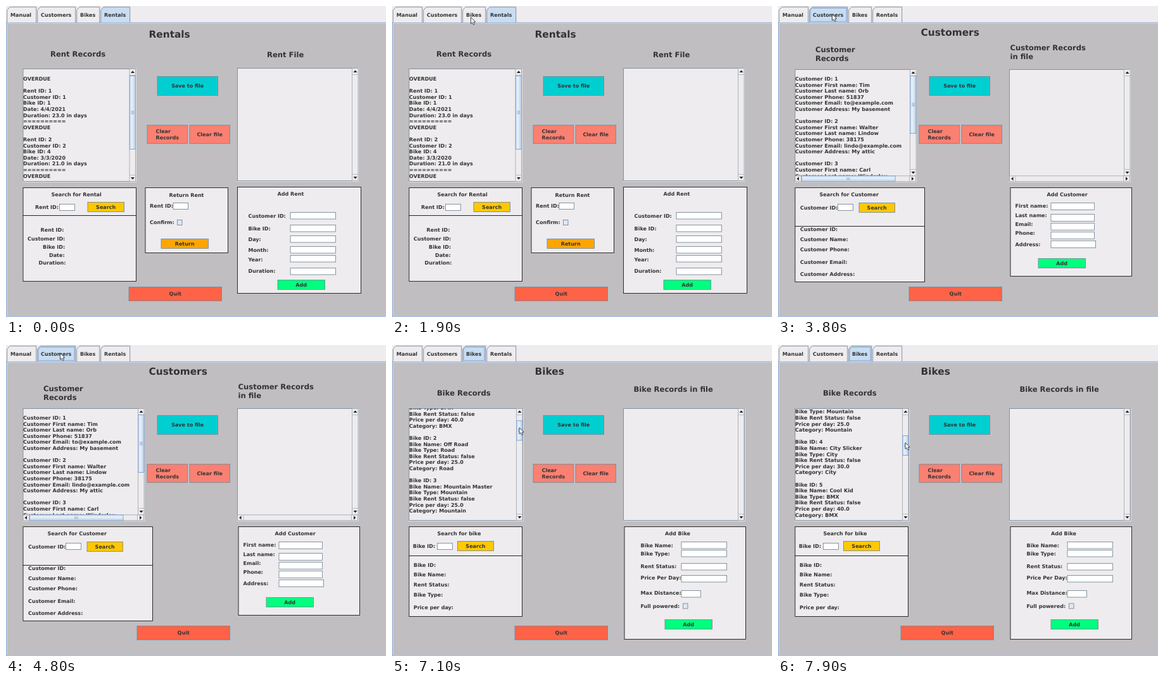
These frames come from a looping animation (600 px wide and 492 px high, 8 s). An HTML page:

```html
<!DOCTYPE html>
<html lang="en">
<head>
<meta charset="utf-8">
<title>Bike rental manager</title>
<style>
  html, body { margin: 0; width: 100%; height: 100%; overflow: hidden; background: #eeecee; }
  svg { display: block; }
  text {
    font-family: "DejaVu Sans", sans-serif; font-weight: bold; fill: #333;
    text-rendering: geometricPrecision; white-space: pre;
  }
</style>
</head>
<body>
<svg id="stage" width="600" height="492" viewBox="0 0 600 492">
  <defs>
    <linearGradient id="thumb">
      <stop offset="0" stop-color="#d4e3f5"/>
      <stop offset=".4" stop-color="#e6f0fa"/>
      <stop offset="1" stop-color="#b8cfe5"/>
    </linearGradient>
    <linearGradient id="thumbH" x2="0" y2="1">
      <stop offset="0" stop-color="#d4e3f5"/>
      <stop offset=".4" stop-color="#e6f0fa"/>
      <stop offset="1" stop-color="#b8cfe5"/>
    </linearGradient>
  </defs>
</svg>
<script>
const PANEL = '#eeecee', EDGE = '#7a8a99', BLUE = '#7f9acb', SELECTED = '#c8ddf2';
const LINE = 9.6, LOOP = 8000, TICK = 100;
const stage = document.getElementById('stage');

// Boxes are given by their outer edges; labels by left edge and cap middle.
const box = (x1, y1, x2, y2, fill, stroke = EDGE, width = .9) =>
  `<rect x="${x1 + 1}" y="${y1 + .5}" width="${x2 - x1 - 1.5}" height="${y2 - y1 - 1}" fill="${fill}" stroke="${stroke}" stroke-width="${width}"/>`;
const path = (d, fill, stroke = 'none', width = 1) =>
  `<path d="${d}" fill="${fill}" stroke="${stroke}" stroke-width="${width}"/>`;
const text = (s, x, y, size, anchor) =>
  `<text x="${x}" y="${(y + size * .365).toFixed(2)}" font-size="${size}" text-anchor="${anchor}">${s}</text>`;
const label = (s, x, y, size = 8.05) => text(s, x + .5, y, size, 'start');
const labels = (x, rows) => rows.map(([s, y]) => label(s, x, y)).join('');
const panel = (x1, y1, x2, y2) => box(x1, y1, x2, y2, PANEL, '#1a1a1a');
const field = (x1, y1, x2, y2) => box(x1, y1, x2, y2, '#fff');
const check = (x, y) => box(x, y, x + 9, y + 9, '#dde8f3');
const button = (s, x1, y1, x2, y2, fill) =>
  box(x1, y1, x2, y2, fill) + text(s, (x1 + x2) / 2 + .2, (y1 + y2) / 2, 8.05, 'middle');

function tabs(active, focused) {
  const list = [['Manual', 1, 48], ['Customers', 49, 110], ['Bikes', 111, 148], ['Rentals', 149, 196]];
  return list.map(([name, l, r]) => {
    const on = name === active;
    return path(`M${l + .7} 26V6.5L${l + 5} 1.7H${r - .3}V26`, on ? SELECTED : PANEL, EDGE, .9) +
      (on && focused ? path(`M${l + 2} 24.5V7L${l + 5.5} 3.5H${r - 2}V24.5Z`, 'none', BLUE, .8) : '') +
      label(name, l + 5.5, 14);
  }).join('');
}

function frame(active, focused) {
  return '<rect y="26" width="600" height="466" fill="#c8d8ec"/>' +
    path('M0 26.3H600M.5 26V492M0 491H600', 'none', '#8ba1cb', .8) +
    '<rect x="2" y="28" width="598" height="462" fill="#c0bec0"/>' + tabs(active, focused);
}

function vbar(x, y1, y2, top, size) {
  const c = x + 6;
  let s = box(x, y1, x + 11, y2, PANEL, '#9aa5b0', .8) +
    path(`M${x + 1} ${y1 + 10.5}h10M${x + 1} ${y2 - 10.5}h10`, 'none', '#a9b3bd', .8) +
    path(`M${c - 3} ${y1 + 7}h6l-3 -3.4zM${c - 3} ${y2 - 7}h6l-3 3.4z`, '#222');
  if (size) {
    const m = top + size / 2;
    s += `<g class="knob">${box(x + .3, top, x + 11, top + size, 'url(#thumb)', BLUE)}` +
      path(`M${x + 3.5} ${m - 2}h5m-5 2h5m-5 2h5`, 'none', BLUE, .8) + '</g>';
  }
  return s;
}

function hbar(y, x1, x2, left, size) {
  const c = y + 5;
  let s = box(x1, y, x2, y + 10, PANEL, '#9aa5b0', .8) +
    path(`M${x1 + 10.5} ${y}v10M${x2 - 10.5} ${y}v10`, 'none', '#a9b3bd', .8) +
    path(`M${x1 + 7} ${c - 3}v6l-3.4 -3zM${x2 - 7} ${c - 3}v6l3.4 -3z`, '#222');
  if (size) {
    const m = left + size / 2;
    s += box(left, y, left + size, y + 10, 'url(#thumbH)', BLUE) +
      path(`M${m - 2} ${y + 3}v4m2 -4v4m2 -4v4`, 'none', BLUE, .8);
  }
  return s;
}

const pane = (x1, y1, x2, y2) => box(x1, y1, x2, y2, PANEL) +
  path(`M${x2 + .5} ${y1}V${y2 + .5}H${x1}`, 'none', '#e4e4e6');

// Text area content, cut off at the edges of its view.
function records(lines, right, bottom) {
  const body = lines.map((s, i) => s ? label(s, 26.6, 105.4 + i * LINE) : '').join('');
  return `<svg x="27" y="101" width="${right - 27}" height="${bottom - 101}" viewBox="27 101 ${right - 27} ${bottom - 101}"><g class="lines">${body}</g></svg>`;
}

const actions = quitX => button('Save to file', 238, 111, 335, 142, '#00ced1') +
  box(222, 188, 287, 218, '#fa8072') + labels(236, [['Clear', 198.5], ['Records', 208.2]]) +
  button('Clear file', 289, 188, 354, 218, '#fa8072') +
  button('Quit', quitX, 444, quitX + 148, 467, '#ff6347');

function rentalsPage() {
  const rent = (id, who, bike, date, days) => ['OVERDUE', '', `Rent ID: ${id}`, `Customer ID: ${who}`,
    `Bike ID: ${bike}`, `Date: ${date}`, `Duration: ${days} in days`, '=========='];
  const lines = ['', ...rent(1, 1, 1, '4/4/2021', '23.0'), ...rent(2, 2, 4, '3/3/2020', '21.0'), 'OVERDUE'];
  return frame('Rentals', false) +
    label('Rentals', 225, 44.5, 15.35) + label('Rent Records', 69.5, 76, 11.6) + label('Rent File', 411.5, 77, 11.6) +
    pane(26, 99, 205, 278) + records(lines, 194, 278) + vbar(194, 99, 278, 110, 117) +
    pane(364.5, 98, 556, 277) + vbar(545.5, 98, 277) + actions(193) +
    panel(26, 331, 206, 436) + panel(26, 287, 206, 332) +
    label('Search for Rental', 71, 298) + label('Rent ID:', 45.5, 318) + field(83.5, 313, 109, 324) +
    button('Search', 128, 310, 187, 326, '#ffc800') +
    label('Rent ID:', 54, 354) + label('Customer ID:', 33.5, 368) + label('Bike ID:', 57.5, 381) +
    label('Date:', 67.5, 394) + label('Duration:', 51, 406.5) +
    panel(219, 287, 351, 391) + label('Return Rent', 257, 299.5) + label('Rent ID:', 226.5, 316.5) +
    field(263, 311, 288, 322) + label('Confirm:', 226.5, 342) + check(269.5, 338) +
    button('Return', 244, 368, 320, 384, '#ffa500') +
    panel(364.5, 286, 561, 455) + label('Add Rent', 428, 297) +
    labels(382, [['Customer ID:', 332], ['Bike ID:', 352], ['Day:', 369], ['Month:', 386], ['Year:', 401], ['Duration:', 419]]) +
    [326, 346, 363, 380, 394, 414].map(y => field(448, y, 521, y + 11.5)).join('') +
    button('Add', 428, 433, 504, 449, '#00ff7f');
}

function bikesPage() {
  const bikes = [['Trick Master', 'BMX', '40.0'], ['Off Road', 'Road', '25.0'], ['Mountain Master', 'Mountain', '25.0'],
    ['City Slicker', 'City', '30.0'], ['Cool Kid', 'BMX', '40.0']];
  const lines = ['', ''];
  bikes.forEach(([name, type, price], i) => lines.push(`Bike ID: ${i + 1}`, `Bike Name: ${name}`, `Bike Type: ${type}`,
    'Bike Rent Status: false', `Price per day: ${price}`, `Category: ${type}`, ''));
  lines.push('Bike ID: 6');
  return frame('Bikes', true) +
    label('Bikes', 225, 41.5, 15.35) + label('Bike Records', 70.5, 76, 11.6) + label('Bike Records in file', 381, 70, 11.6) +
    pane(26, 100, 207, 278) + records(lines, 196, 278) + vbar(195.5, 100, 278, 111, 32) +
    pane(364.5, 100, 557, 278) + vbar(545.5, 100, 278) + actions(193) +
    panel(26, 333, 206, 430) + panel(26, 287, 206, 334) +
    label('Search for bike', 71, 298) + label('Bike ID:', 32.5, 318) + field(70.5, 313, 96, 324) +
    button('Search', 102.5, 310, 161, 326, '#ffc800') +
    labels(33.5, [['Bike ID:', 348], ['Bike Name:', 363.5], ['Rent Status:', 379], ['Bike Type:', 395], ['Price per day:', 415.5]]) +
    panel(366, 287, 559, 466) + label('Add Bike', 430.5, 298) +
    labels(392, [['Bike Name:', 317], ['Bike Type:', 330], ['Rent Status:', 350], ['Price Per Day:', 368.5], ['Max Distance:', 392.5], ['Full powered:', 413]]) +
    [311, 324, 345, 364].map(y => field(456, y, 529, y + 11.5)).join('') + field(456, 388, 488, 399.5) + check(458.5, 408.5) +
    button('Add', 430, 434, 506, 450, '#00ff7f');
}

function customersPage() {
  const people = [['Tim', 'Orb', '51837', 'to@example.com', 'My basement'],
    ['Walter', 'Lindow', '38175', 'lindo@example.com', 'My attic'], ['Carl', 'Winderley']];
  const heads = ['First name', 'Last name', 'Phone', 'Email', 'Address'];
  const lines = [''];
  people.forEach((p, i) => lines.push(`Customer ID: ${i + 1}`, ...p.map((v, k) => `Customer ${heads[k]}: ${v}`), ''));
  return frame('Customers', true) +
    label('Customers', 225, 41.5, 15.35) +
    label('Customer', 58.5, 69, 11.6) + label('Records', 58.5, 83, 11.6) +
    label('Customer Records', 366, 66, 11.6) + label('in file', 366, 80, 11.6) +
    pane(26, 100, 218, 278) + records(lines, 208, 269) + vbar(207.5, 100, 269, 110, 92) + hbar(268.3, 26, 218, 36.5, 149) +
    pane(364.5, 100, 556, 278) + vbar(545.5, 100, 269) + hbar(268.3, 364.5, 556) + actions(206) +
    panel(26, 348, 232, 437) +
    labels(34.5, [['Customer ID:', 353.5], ['Customer Name:', 369.5], ['Customer Phone:', 385.5], ['Customer Email:', 405], ['Customer Address:', 424]]) +
    panel(26, 287, 232, 349) +
    label('Search for Customer', 65, 298) + label('Customer ID:', 34.5, 319.5) + field(93.5, 313, 119, 324) +
    button('Search', 127, 311, 185, 327, '#ffc800') +
    panel(366, 287, 559, 428) + label('Add Customer', 424, 298) +
    labels(374, [['First name:', 316.5], ['Last name:', 331], ['Email:', 345], ['Phone:', 359], ['Address:', 377]]) +
    [311, 329, 343, 357].map(y => field(430, y, 500, y + 12)).join('') + field(430, 371, 502, 383) +
    button('Add', 410, 399, 486, 415, '#00ff7f');
}

function addGroup(html) {
  const g = document.createElementNS('http://www.w3.org/2000/svg', 'g');
  g.innerHTML = html;
  stage.append(g);
  return g;
}

const pages = { rentals: addGroup(rentalsPage()), bikes: addGroup(bikesPage()), customers: addGroup(customersPage()) };
const cursor = addGroup(path('M0 0V10L2.3 8L4 11.6L5.9 10.7L4.3 7.2L7.3 7Z', '#fff', '#2c3038', .9));
const lines = pages.bikes.querySelector('.lines');
const knob = pages.bikes.querySelector('.knob');

// [time, x, y] stops of the pointer and [time, page] of the clicks
const moves = [[300, -10, 300], [1000, 58, 231], [1500, 124.5, 18], [3200, 124.5, 18], [3500, 85.5, 13],
  [4900, 85.5, 13], [5300, 126.5, 11], [5900, 126.5, 11], [6600, 201, 122.5], [6820, 201, 122.5], [7900, 201, 154.5]];
const clicks = [[0, 'rentals'], [2800, 'bikes'], [3600, 'customers'], [5400, 'bikes']];

function pointer(t) {
  const i = moves.findIndex(m => m[0] > t);
  if (i === 0) return moves[0].slice(1);
  if (i < 0) return moves[moves.length - 1].slice(1);
  const [t0, x0, y0] = moves[i - 1], [t1, x1, y1] = moves[i];
  let k = (t - t0) / (t1 - t0);
  if (t0 < 6800) k = k * k * (3 - 2 * k);
  return [x0 + (x1 - x0) * k, y0 + (y1 - y0) * k];
}

function render(now) {
  const t = Math.floor(now % LOOP / TICK) * TICK;
  const page = clicks.filter(c => c[0] <= t).pop()[1];
  for (const name in pages) pages[name].style.display = name === page ? '' : 'none';
  const scroll = Math.max(0, (t - 6820) * .16);
  lines.setAttribute('transform', `translate(0 ${-scroll})`);
  knob.setAttribute('transform', `translate(0 ${scroll / 5.4})`);
  cursor.setAttribute('transform', `translate(${pointer(t)})`);
}

const start = performance.now();
function loop() {
  render(performance.now() - start);
  requestAnimationFrame(loop);
}
loop();
</script>
</body>
</html>
```
